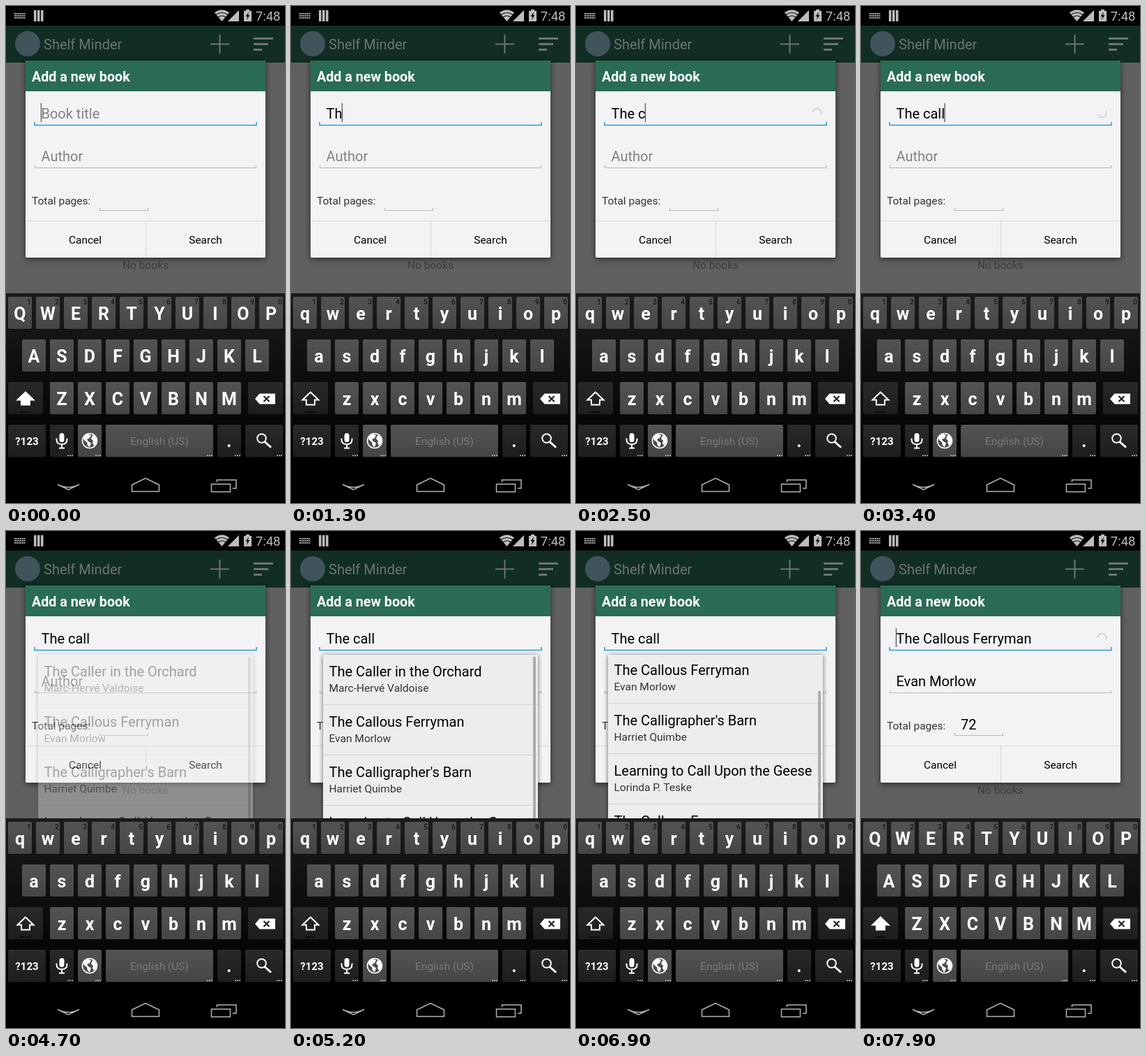
Write an HTML page that moves like this. It is 400x711 px and loops after 8000 ms.

```html
<!DOCTYPE html>
<html lang="en">
<head>
<meta charset="utf-8">
<title>Add a new book</title>
<style>
  html, body { margin: 0; width: 100%; height: 100%; overflow: hidden; background: #000; }
  svg { display: block; width: 100vw; height: 100vh; }
  text { font-family: Roboto, "Noto Sans", sans-serif; font-size: 20px; white-space: pre; }
  .small { font-size: 15.5px; }
  .bold { font-weight: 700; }
  .mid { text-anchor: middle; }
  .hint { fill: #828184; }
  .letter { font-size: 25px; font-weight: 700; fill: #fff; text-anchor: middle; }
  .num { font-size: 10.5px; font-weight: 700; fill: #202020; text-anchor: middle; }
  .line { fill: none; stroke: #b9b8ba; stroke-width: 1.2; }
  .dialog { filter: drop-shadow(0 2px 4px rgba(0, 0, 0, .6)); }
  .list { filter: drop-shadow(0 1px 3px rgba(0, 0, 0, .6)); }
</style>
</head>
<body>
<svg viewBox="0 0 400 711">
  <defs>
    <linearGradient id="light" x2="0" y2="1">
      <stop stop-color="#535353"/><stop offset="1" stop-color="#454545"/>
    </linearGradient>
    <linearGradient id="dark" x2="0" y2="1">
      <stop stop-color="#292929"/><stop offset="1" stop-color="#1d1d1d"/>
    </linearGradient>
    <linearGradient id="board" x2="0" y2="1">
      <stop stop-color="#1b1b1b"/><stop offset="1" stop-color="#000"/>
    </linearGradient>
    <clipPath id="listBox"><rect x="46" y="177" width="308" height="235"/></clipPath>
  </defs>

  <!-- dimmed screen -->
  <rect width="400" height="711"/>
  <rect y="81" width="400" height="331" fill="#606060"/>
  <rect y="28" width="400" height="53" fill="#112d24"/>
  <circle cx="31" cy="54" r="18" fill="#40545c"/>
  <text x="54" y="62" fill="#6c7472">Shelf Minder</text>
  <path d="M293 54.500h27M306.500 41v27" stroke="#6c7472" stroke-width="2"/>
  <path d="M355 46.500h28M355 54.500h21M355 62.500h12" stroke="#6c7472" stroke-width="3"/>
  <text x="200" y="376" class="small mid" fill="#3b3b3b">No books</text>

  <!-- status bar -->
  <g fill="#bdbdbd">
    <path d="M12 11h16M12 14h16M12 17h16" stroke="#a8a8a8" stroke-width="2" stroke-dasharray="2 .7"/>
    <path d="M40 6h3.500v16h-3.500zM45 6h3.500v16h-3.500zM50 6h3.500v16h-3.500z"/>
    <path d="M309.500 22L299 9.500q10.500-8 21 0z"/>
    <path d="M301 12.500q8.500-6 17 0M304 16q5.500-4 11 0" fill="none" stroke="#111" stroke-width="1.200"/>
    <path d="M334 6v16h-16z"/>
    <path d="M344 5h5v2h3v15h-11v-15h3z"/>
    <path d="M348 8.500l-4.500 6.500h2.500l-1 5 4.500-7h-2.500z" fill="#111"/>
    <text x="393.500" y="21" text-anchor="end" style="font-size:18.500px">7:48</text>
  </g>

  <!-- dialog -->
  <g class="dialog">
    <rect x="28" y="78" width="344" height="282" rx="2" fill="#f3f2f4"/>
    <path d="M28 122v-42q0-2 2-2h340q2 0 2 2v42z" fill="#2a6b55"/>
  </g>
  <text x="37" y="108" class="bold" fill="#fff" style="font-size:19.700px">Add a new book</text>
  <path d="M41 166v4.500h318v-4.500" class="line" style="stroke:#2a9fd6;stroke-width:1.600"/>
  <path d="M41.500 228v3.500h317v-3.500M134.500 289v3.500h69v-3.500" class="line"/>
  <path d="M28 307.500h344M200.500 308v52" class="line" style="stroke:#d8d7d9;stroke-width:1"/>
  <text id="book" x="50.500" y="161"></text>
  <rect id="caret" y="139" width="1.300" height="27" fill="#555"/>
  <circle id="spin" cx="345.500" cy="153" r="6.300" fill="none" stroke="#cbcacc" stroke-width="1.500" stroke-dasharray="20 30"/>
  <text id="author" x="50.500" y="222"></text>
  <text x="37" y="284" class="small" fill="#333">Total pages:</text>
  <text id="pages" x="143" y="284"></text>
  <text x="113.500" y="340" class="small mid">Cancel</text>
  <text x="286" y="340" class="small mid">Search</text>

  <!-- suggestions -->
  <g id="list" class="list">
    <rect x="46" y="177" width="308" height="239" fill="#eeecee"/>
    <g clip-path="url(#listBox)">
      <g id="rows"></g>
      <rect id="bar" x="347" y="180" width="4" height="300" fill="#aeadaf"/>
    </g>
  </g>

  <!-- keyboard -->
  <rect y="411" width="400" height="240" fill="url(#board)"/>
  <g id="keys"></g>
  <path id="shift" d="M28 552.500L39.500 563.500H34v7H22v-7h-5.500z" stroke="#fff" stroke-width="2"/>
  <path d="M20 581h15" stroke="#0c0c0c" stroke-width="2"/>
  <path d="M357 562l6.500-7.500H386v15h-22.500z" fill="#fff"/>
  <path d="M369.500 558l8 8m0-8l-8 8" stroke="#222" stroke-width="2.200"/>
  <text x="30" y="628" class="bold mid" fill="#fff" style="font-size:15px">?123</text>
  <text x="220" y="628" class="small mid" fill="#7b7b7b">English (US)</text>
  <text x="320" y="631" class="letter">.</text>
  <g fill="none" stroke="#fff" stroke-width="2">
    <rect x="76.500" y="611" width="7" height="13" rx="3.500" fill="#fff" stroke="none"/>
    <path d="M72.500 618.500v1.500q0 7 7.500 7t7.500-7v-1.500M80 627v5M76 632.500h8"/>
    <circle cx="366.500" cy="618.500" r="6.300"/>
    <path d="M371 623.500l9 8" stroke-width="3"/>
    <circle cx="120" cy="622" r="10.500" stroke-width="1.600"/>
  </g>
  <path d="M111 617l6-5 5 2-2 4-4 2 2 3 4 2-2 6-3-2-1-5-4-3zM124 614l3 1 3 6-1 5-3 3-2-4 1-3-3-3z" fill="#fff"/>
  <path id="dots" stroke="#bbb" stroke-width="1.600" stroke-dasharray="2 1"/>
  <g id="preview">
    <rect x="-30" y="-68" width="60" height="68" rx="2" fill="#3c3c3c"/>
    <text y="-23" class="letter" style="font-size:32px"></text>
  </g>

  <!-- navigation bar -->
  <g fill="none" stroke="#b4b4b4" stroke-width="1.500">
    <path d="M74 684.500q8 4 15.500 4t15.500-4l-15.500 7.500z"/>
    <path d="M180.500 694.500v-9.500L200 675.500l19.500 9.500v9.500z"/>
    <path d="M294.500 684h27v11h-27zM302.500 681v-3h27.500v12h-5"/>
  </g>
</svg>
<script>
const LOOP = 8000, STEP = 100;
const $ = id => document.getElementById(id);
const clamp = (v, a = 0, b = 1) => Math.min(b, Math.max(a, v));
const ramp = (t, from, to) => clamp((t - from) / (to - from));
const smooth = p => p * p * (3 - 2 * p);
const show = (el, on) => el.setAttribute('visibility', on ? 'visible' : 'hidden');

function add(parent, tag, attrs, text = '') {
  const el = document.createElementNS('http://www.w3.org/2000/svg', tag);
  for (const k in attrs) el.setAttribute(k, attrs[k]);
  el.textContent = text;
  parent.append(el);
  return el;
}

const BOOKS = [
  ['The Caller in the Orchard', 'Marc-Hervé Valdoise'],
  ['The Callous Ferryman', 'Evan Morlow'],
  ["The Calligrapher's Barn", 'Harriet Quimbe'],
  ['Learning to Call Upon the Geese', 'Lorinda P. Teske'],
  ['The Callous Ferryman', 'Evan Morlow']
];
const PICK = BOOKS[1];

BOOKS.forEach(([title, author], i) => {
  const y = 176 + 72 * i;
  add($('rows'), 'text', { x: 54.5, y: y + 32 }, title);
  add($('rows'), 'text', { x: 54.5, y: y + 54, class: 'small', fill: '#333' }, author);
  add($('rows'), 'path', { d: `M46 ${y + 72.5}h308`, stroke: '#d2d0d2' });
});

// Keyboard
const keys = {};
function addKey(x, y, w, shade) {
  add($('keys'), 'rect', { x, y: y + 1, width: w, height: 46, rx: 2, fill: '#0a0a0a' });
  return add($('keys'), 'rect', { x, y, width: w, height: 46, rx: 2, fill: `url(#${shade})` });
}
[['qwertyuiop', 3, 416], ['asdfghjkl', 23, 477], ['zxcvbnm', 63, 538]].forEach(([row, x0, y], r) => {
  [...row].forEach((ch, i) => {
    const x = x0 + 40 * i;
    const cap = addKey(x, y, 34, 'light');
    const label = add($('keys'), 'text', { x: x + 17, y: y + 33, class: 'letter' });
    keys[ch] = { cap, label, x: x + 17, y };
    if (r === 0) add($('keys'), 'text', { x: x + 30, y: y + 10.5, class: 'num' }, (i + 1) % 10);
  });
});
[[3, 538, 50], [347, 538, 50], [3, 599, 54], [63, 599, 34], [303, 599, 34], [343, 599, 54]]
  .forEach(([x, y, w]) => addKey(x, y, w, 'dark'));
addKey(103, 599, 34, 'light');
keys[' '] = { cap: addKey(143, 599, 154, 'light') };
$('dots').setAttribute('d', [96, 136, 296, 336, 396].map(x => `M${x - 8} 643h8`).join(''));

// Typing: each character lands one step after its key goes down
const TYPED = 'The call';
const PRESS = [700, 1100, 1500, 1900, 2300, 2700, 3000, 3200];
const FILL = 7500;

function drawField(t) {
  const filled = t >= FILL;
  const count = PRESS.filter(p => t >= p + STEP).length;
  const value = filled ? PICK[0] : TYPED.slice(0, count);
  const book = $('book');
  book.textContent = value || 'Book title';
  book.setAttribute('class', value ? '' : 'hint');
  $('author').textContent = filled ? PICK[1] : 'Author';
  $('author').setAttribute('class', filled ? '' : 'hint');
  $('pages').textContent = filled ? '72' : '';

  const edited = filled ? FILL : count ? PRESS[count - 1] + STEP : 0;
  const atEnd = value && !filled;
  $('caret').setAttribute('x', 49.8 + (atEnd ? book.getComputedTextLength() : 0));
  show($('caret'), (t - edited) % 1000 < 500 && (t < 4700 || filled));

  show($('spin'), (t >= 1600 && t < 4700) || filled);
  const turn = -170 - 0.24 * (t - (filled ? 7900 : 2500));
  $('spin').setAttribute('transform', `rotate(${turn} 345.5 153)`);
}

function drawKeys(t) {
  const caps = t < PRESS[0] + STEP || t >= FILL;
  const i = PRESS.findIndex(p => t >= p && t < p + STEP);
  const down = i < 0 ? '' : TYPED[i].toLowerCase();
  for (const ch in keys) {
    const { cap, label } = keys[ch];
    cap.setAttribute('fill', ch === down ? '#6e6e6e' : 'url(#light)');
    if (label) label.textContent = caps ? ch.toUpperCase() : ch;
  }
  $('shift').setAttribute('fill', caps ? '#fff' : 'none');
  const key = keys[down];
  const visible = Boolean(key && key.label);
  show($('preview'), visible);
  if (visible) {
    $('preview').setAttribute('transform', `translate(${key.x} ${key.y})`);
    $('preview').lastElementChild.textContent = TYPED[i];
  }
}

function drawList(t) {
  const alpha = ramp(t, 4600, 4900) * (1 - ramp(t, 7100, 7400));
  $('list').style.opacity = alpha;
  show($('list'), alpha > 0);
  const p = smooth(ramp(t, 5900, 6800));
  $('rows').setAttribute('transform', `translate(0 ${-74 * p})`);
  $('bar').setAttribute('y', 180 + 49 * p);
  $('bar').setAttribute('opacity', t < 5900 ? 1 - ramp(t, 5200, 5400) : 1);
}

function frame(now) {
  const t = Math.floor((now % LOOP) / STEP) * STEP;
  drawField(t);
  drawKeys(t);
  drawList(t);
}

const start = performance.now();
function tick() {
  frame(performance.now() - start);
  requestAnimationFrame(tick);
}
tick();
</script>
</body>
</html>
```
